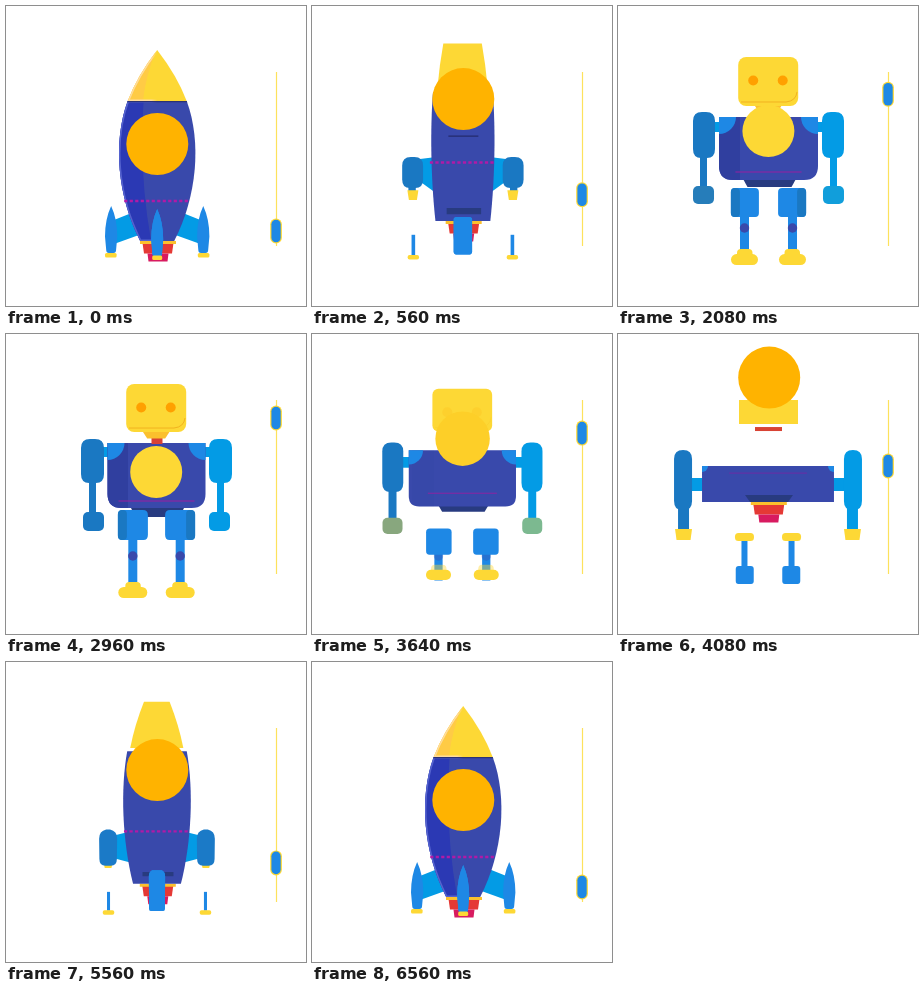
Write an HTML page with a canvas that moves like this. It is 300x300 px and loops after 6.6 s.

```html
<!DOCTYPE html>
<html lang="en">
<head>
<meta charset="utf-8">
<title>Rocket robot</title>
<style>
html, body { margin: 0; width: 100%; height: 100%; overflow: hidden; background: #fff; }
canvas { display: block; width: 300px; height: 300px; }
</style>
</head>
<body>
<canvas id="stage"></canvas>
<script>
const LOOP = 6600;
const YELLOW = '#fdd835', BLUE = '#1e88e5', DEEP = '#1a78c2', SKY = '#039be5';
const INDIGO = '#3949ab', NAVY = '#283b80', RED = '#e53935', PINK = '#d81b60';

const canvas = document.getElementById('stage');
const c = canvas.getContext('2d');
const dpr = window.devicePixelRatio || 1;
canvas.width = canvas.height = 300 * dpr;

// Progress from rocket (0) to robot (1) over time
const TIMES = [0, 640, 1120, 1400, 2080, 2500, 3280, 4080, 4880, 5480, 6160, 6560, 6600];
const VALUES = [0, .3, .56, .66, .97, 1, 1, .66, .32, .19, .03, 0, 0];
// Progress at which each pose below is reached
const POSES = [0, .32, .56, .66, .97, 1];
let p = 0, axis = 150;

const clamp = v => Math.max(0, Math.min(1, v));
const lerp = (a, b, u) => a + (b - a) * u;
const ramp = (a, b) => clamp((p - a) / (b - a));

function slope(i) {
  return (VALUES[i + 1] - VALUES[i]) / (TIMES[i + 1] - TIMES[i]);
}

function tangent(i) {
  if (i === 0 || i === TIMES.length - 1) return 0;
  const a = slope(i - 1), b = slope(i);
  if (a * b <= 0) return 0;
  const m = Math.min(Math.abs(a + b) / 2, 3 * Math.abs(a), 3 * Math.abs(b));
  return m * Math.sign(a);
}

function progress(t) {
  let i = 0;
  while (i < TIMES.length - 2 && t >= TIMES[i + 1]) i++;
  const d = TIMES[i + 1] - TIMES[i], u = (t - TIMES[i]) / d;
  const s = u * u * (3 - 2 * u);
  return clamp(lerp(VALUES[i], VALUES[i + 1], s)
    + d * tangent(i) * u * (1 - u) * (1 - u)
    - d * tangent(i + 1) * u * u * (1 - u));
}

// Value of the current pose, one argument per pose
function k(...v) {
  let i = 0;
  while (i < POSES.length - 2 && p >= POSES[i + 1]) i++;
  return lerp(v[i], v[i + 1], (p - POSES[i]) / (POSES[i + 1] - POSES[i]));
}

function mix(a, b, u) {
  const at = (s, i) => parseInt(s.slice(i, i + 2), 16);
  return 'rgb(' + [1, 3, 5].map(i => Math.round(lerp(at(a, i), at(b, i), u))) + ')';
}

function fill(color) {
  c.fillStyle = color;
  c.fill();
}

function box(x, y, x2, y2, r, color) {
  if (x2 - x < .2 || y2 - y < .2) return;
  c.beginPath();
  c.roundRect(x, y, x2 - x, y2 - y, Math.min(r, (x2 - x) / 2, (y2 - y) / 2));
  fill(color);
}

function disc(x, y, r, color) {
  c.beginPath();
  c.arc(x, y, r, 0, Math.PI * 2);
  fill(color);
}

function trap(x, y, top, bottom, h, color) {
  c.beginPath();
  c.moveTo(x - top, y);
  c.lineTo(x + top, y);
  c.lineTo(x + bottom, y + h);
  c.lineTo(x - bottom, y + h);
  fill(color);
}

function faded(alpha, draw) {
  if (alpha <= 0) return;
  c.save();
  c.globalAlpha = alpha;
  draw();
  c.restore();
}

function bothSides(draw) {
  draw(false);
  c.save();
  c.translate(axis * 2, 0);
  c.scale(-1, 1);
  draw(true);
  c.restore();
}

// Highlight along the left edge of the current path
function litEdge(color) {
  const g = c.createLinearGradient(axis - 6, 0, axis, 0);
  g.addColorStop(0, color);
  g.addColorStop(1, color + '00');
  c.strokeStyle = g;
  c.lineWidth = 3;
  c.stroke();
}

// Rounded block whose top sharpens into a fin tip
function fin(x, y, x2, y2, r, sharp, color) {
  const m = (x + x2) / 2, hw = (x2 - x) / 2, h = y2 - y;
  r = Math.min(r, hw, h / 2);
  const ry = lerp(r, h * .65, sharp), cy = y + h * .28 * sharp;
  const flat = (hw - r) * (1 - sharp), foot = hw * (1 - .2 * sharp);
  c.beginPath();
  c.moveTo(m - flat, y);
  c.lineTo(m + flat, y);
  c.quadraticCurveTo(m + hw, cy, x2, y + ry);
  c.lineTo(m + foot, y2 - r);
  c.quadraticCurveTo(m + foot, y2, m + foot - r * .9, y2);
  c.lineTo(m - foot + r * .9, y2);
  c.quadraticCurveTo(m - foot, y2, m - foot, y2 - r);
  c.lineTo(x, y + ry);
  c.quadraticCurveTo(m - hw, cy, m - flat, y);
  fill(color);
}

function struts() {
  const x = k(108, 108, 84, 73, 95, 96), x2 = k(133, 122, 94, 86, 103, 103);
  c.beginPath();
  c.moveTo(x, k(214, 138, 143, 144, 116, 113));
  c.lineTo(x2, k(204, 138, 143, 144, 116, 113));
  c.lineTo(x2, k(229, 177, 160, 157, 126, 123));
  c.lineTo(x, k(238, 160, 160, 157, 126, 123));
  fill(SKY);
}

function engine() {
  const y = k(235, 210, 179.5, 168, 160, 160), s = k(1, 1, 1, 1, .1, 0), x = axis + .8;
  trap(x, y + 2 * s, 15.5, 14, 10.5 * s, RED);
  trap(x, y + 12.5 * s, 10.5, 9.5, 8 * s, PINK);
  faded(.55 * ramp(.4, .5) * (1 - ramp(.56, .66)), () =>
    box(x - 14, y + 2 * s, x - 9, y + 12.5 * s, 0, '#7b1f4b'));
  box(x - 18, y, x + 18, y + 3 * s, 0, '#fbc02d');
}

function hullPath() {
  const top = k(95, 84, 121, 132, 111, 109), bottom = k(235, 210, 178, 168, 174, 174);
  const a = k(29.5, 30, 58, 66, 49.5, 49), b = k(17, 30, 58, 66, 49.5, 49);
  const u = k(44.5, 30, 58, 66, 49.5, 49), v = k(40, 30, 58, 66, 49.5, 49);
  const r = k(0, 0, 0, 0, 14, 14), h = bottom - top;
  const y1 = top + h * .29, y2 = top + h * .68;
  c.beginPath();
  c.moveTo(axis - a, top);
  c.lineTo(axis + a, top);
  c.bezierCurveTo(axis + u, y1, axis + v, y2, axis + b, bottom - r);
  c.quadraticCurveTo(axis + b, bottom, axis + b - r, bottom);
  c.lineTo(axis - b + r, bottom);
  c.quadraticCurveTo(axis - b, bottom, axis - b, bottom - r);
  c.bezierCurveTo(axis - v, y2, axis - u, y1, axis - a, top);
  return { top, bottom, a };
}

function body() {
  c.save();
  const { top, bottom, a } = hullPath();
  fill(INDIGO);
  c.clip();
  faded(1 - ramp(0, .15), () => {
    c.beginPath();
    c.moveTo(100, 90);
    c.lineTo(138, 90);
    c.quadraticCurveTo(132, 165, 146, 240);
    c.lineTo(100, 240);
    fill('#2b39b4');
    hullPath();
    litEdge('#5563cf');
    box(115, 94.5, 187, 96.2, 0, '#2b3274');
  });
  faded(ramp(.88, .97), () => box(100, top, 122, bottom, 0, '#303f9f'));
  bothSides(() => disc(axis - a, top, k(0, 0, 0, 6, 17, 17), BLUE));
  c.restore();
}

function stripe() {
  const y = k(195, 147, 154, 139, 166, 167), half = k(33, 33, 27, 39, 33, 38);
  const rocket = p < .42;
  c.save();
  c.beginPath();
  if (rocket) c.setLineDash([3.2, 2.3]);
  c.lineWidth = rocket ? 2.4 : 1.2;
  c.strokeStyle = rocket ? '#b01aa7' : mix('#5138a8', '#9c1fa0', ramp(.56, 1));
  c.moveTo(axis - half, y);
  c.lineTo(axis + half, y);
  c.stroke();
  c.restore();
}

function pelvis() {
  const y = k(226, 196, 173, 161, 172, 173), h = k(0, 8, 7, 7, 9, 10);
  trap(axis + 1, y, k(12, 18.5, 22, 24, 27, 27), k(12, 18.5, 19, 19, 22, 22), h, NAVY);
}

function arm(right) {
  const top = k(200, 139, 124, 116, 106, 105), end = k(247, 166, 173, 176, 152, 149);
  const near = mix(BLUE, DEEP, ramp(0, .2));
  const color = right && p > .32 ? mix(DEEP, SKY, ramp(.48, .66)) : near;
  const hand = k(230, 173, 190, 195, 180, 178), handEnd = k(230, 185, 201, 206, 198, 197);
  const x = k(101, 94, 67, 57, 75, 77), x2 = k(108, 106, 82, 74, 96, 98);
  box(k(102, 95, 69, 60, 82, 83), end - 6, k(107, 103, 80, 71, 89, 90), hand + 1, 0, color);
  const grip = mix(YELLOW, right ? SKY : DEEP, ramp(.8, .98));
  if (p < .8) trap((x + x2) / 2, hand, (x2 - x) / 2, (x2 - x) / 2 - 1.5, handEnd - hand, grip);
  else box(x, hand, x2, handEnd, 5, grip);
  fin(k(99, 88, 64.5, 56, 75, 75), top, k(111.3, 111, 85, 74, 97, 98), end,
    k(3, 10, 10, 9, 9, 9), 1 - ramp(0, .2), color);
}

function leg() {
  const mid = k(104.8, 100.5, 119.5, 126.5, 126.5, 126.8);
  const hw = k(1, 2, 3, 3, 4.5, 4.5);
  box(mid - hw, k(232, 228, 208, 205, 205, 202), mid + hw, k(247, 250, 250, 236, 250, 254), 0, BLUE);
  const fw = k(5.8, 5.7, 9, 9.5, 13.5, 14.5), fy = k(247, 249.5, 213.3, 199, 248, 253);
  const fh = k(4.5, 4.5, 7.2, 8, 11, 11);
  faded(ramp(.85, .95), () => box(mid - 7.5, fy - 5, mid + 8, fy + 6, 4, YELLOW));
  box(mid - fw, fy, mid + fw, fy + fh, k(1.5, 2, 3.5, 3.5, 5.5, 5.5), YELLOW);
  faded(ramp(.85, .97), () => disc(mid, 222, 4.7, INDIGO));
}

function thigh() {
  const x = axis - k(0, 0, 15, 23.3, 23.6, 23.6), hw = k(6, 10, 9, 9, 14, 15);
  const top = k(203, 213, 226, 232, 182, 176), end = k(250, 248, 249, 250, 211, 206);
  fin(x - hw, top, x + hw, end, k(2, 3, 3, 3, 4, 5), 1 - ramp(0, .2), BLUE);
  faded(ramp(.9, .97), () => box(x - hw, top, x - hw + 9, end, 4, DEEP));
}

function neck() {
  const y = k(129, 129.5, 101.6, 93, 105, 104), half = k(15, 15, 14, 13.5, 5.5, 5.5);
  faded(ramp(.05, .25), () => box(axis + .5 - half, y, axis + .5 + half, y + k(1.5, 1.5, 3, 4, 6, 6), 0,
    mix('#273078', '#d84334', ramp(.4, .66))));
}

function head() {
  const top = k(44, 36, 59, 66, 51, 50), bottom = k(95, 78, 87, 90, 100, 98);
  const a = k(0, 24, 29, 29.5, 30, 30), b = k(29.5, 24, 29, 29.5, 30, 30);
  const r = k(0, 0, 0, 0, 8, 8), h = bottom - top, bend = k(5, 0, 0, 0, 0, 0);
  const x = k(151.2, 150.4, 150.6, 150.5, 150.2, 150.2);
  faded(ramp(.86, .97), () => trap(x, bottom - 2, 14.5, 9, 8.5, '#fbc02d'));

  function outline() {
    c.beginPath();
    if (r > 0) return c.roundRect(x - a, top, a * 2, h, r);
    c.moveTo(x - a, top);
    c.lineTo(x + a, top);
    c.quadraticCurveTo(x + (a + b) / 2 + bend, top + h / 2, x + b, bottom);
    c.lineTo(x - b, bottom);
    c.quadraticCurveTo(x - (a + b) / 2 - bend, top + h / 2, x - a, top);
  }

  c.save();
  outline();
  fill(YELLOW);
  c.clip();
  faded(1 - ramp(0, .15), () => {
    c.beginPath();
    c.moveTo(x, 42);
    c.quadraticCurveTo(140, 68, 137, 94.5);
    c.lineTo(115, 94.5);
    c.lineTo(115, 42);
    fill('#ffcb45');
    outline();
    litEdge('#ffdc9c');
  });
  c.restore();
  faded(ramp(.88, .97), () => {
    disc(x - 15, top + 23.5, 5, '#ffa000');
    disc(x + 14.5, top + 23.5, 5, '#ffa000');
    c.beginPath();
    c.moveTo(123, bottom - 4);
    c.lineTo(168, bottom - 4);
    c.quadraticCurveTo(178, bottom - 5, 179, bottom - 14);
    c.strokeStyle = '#f2b21f';
    c.lineWidth = 1;
    c.stroke();
  });
}

function coin() {
  disc(k(151.3, 151.3, 151.3, 151.2, 150.4, 150.2), k(138, 82, 57.7, 43.5, 125, 138),
    k(31, 31, 31, 31, 26, 26), mix('#ffb300', YELLOW, ramp(.66, .97)));
}

function slider() {
  const y = 225 - 141 * p;
  box(269.9, 66, 271.1, 240, 0, '#fde25c');
  box(264.2, y - 12.5, 275.9, y + 12.5, 5.8, YELLOW);
  box(265.4, y - 11.3, 274.7, y + 11.3, 4.6, BLUE);
}

function draw(t) {
  p = progress(t);
  axis = k(151.2, 150.8, 150, 150, 150.5, 150.5);
  c.setTransform(dpr, 0, 0, dpr, 0, 0);
  c.fillStyle = '#fff';
  c.fillRect(0, 0, 300, 300);
  bothSides(struts);
  engine();
  if (p > .8) pelvis();
  body();
  if (p <= .8) pelvis();
  stripe();
  neck();
  bothSides(leg);
  bothSides(thigh);
  faded(1 - ramp(0, .12), () => box(axis - 5, 249.5, axis + 5, 254, 1.5, YELLOW));
  bothSides(arm);
  head();
  coin();
  slider();
}

const start = performance.now();
function tick() {
  draw((performance.now() - start) % LOOP);
  requestAnimationFrame(tick);
}
tick();
</script>
</body>
</html>
```
